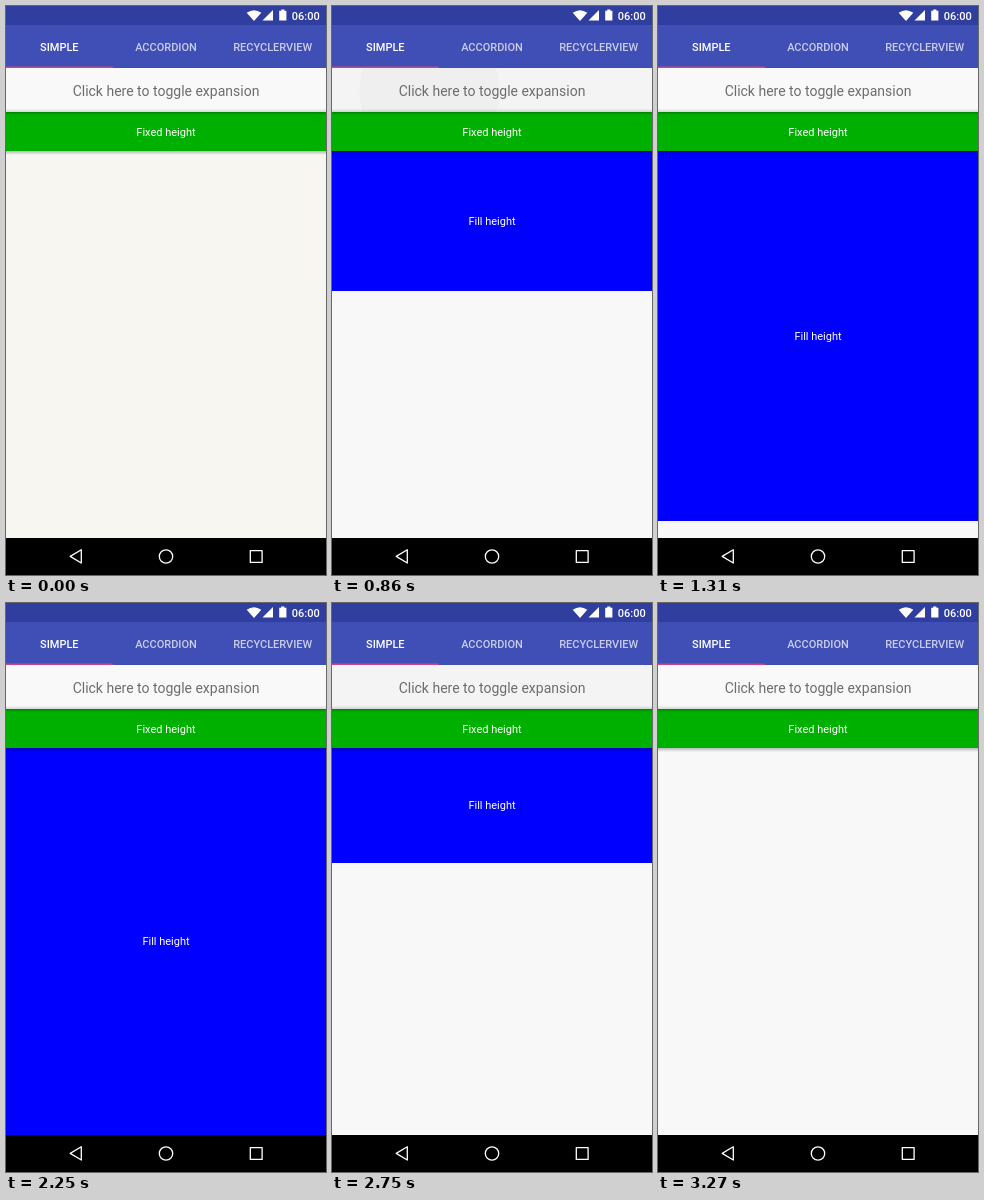
An HTML page for the animation above (3290 ms loop, 320 by 569 pixels).

```html
<!DOCTYPE html>
<html lang="en">
<head>
<meta charset="utf-8">
<title>Expandable layout</title>
<style>
  html, body { margin: 0; width: 100%; height: 100%; overflow: hidden; background: #000; }
  #stage { display: block; width: 100vw; height: 100vh; }
  text { font-family: Roboto, sans-serif; font-size: 11px; fill: #fff; text-anchor: middle; }
  .medium { font-weight: 500; }
  .idle { fill: #c9cdea; }
  .row { font-size: 14px; fill: #6d6d6d; }
  .nav { fill: none; stroke: #fff; stroke-width: 1.3; stroke-linejoin: round; }
</style>
</head>
<body>
<svg id="stage" viewBox="0 0 320 569">
  <defs>
    <linearGradient id="down" x2="0" y2="1">
      <stop offset="0" stop-opacity=".26"/>
      <stop offset="1" stop-opacity="0"/>
    </linearGradient>
    <linearGradient id="up" x2="0" y2="1">
      <stop offset="0" stop-opacity="0"/>
      <stop offset="1" stop-opacity=".14"/>
    </linearGradient>
    <clipPath id="rowClip"><rect y="62" width="320" height="44"/></clipPath>
  </defs>

  <rect id="page" y="62" width="320" height="470" fill="#f8f8f8"/>

  <!-- expanding panel -->
  <svg id="panel" y="145" width="320" height="0" overflow="hidden">
    <rect width="320" height="400" fill="#00f"/>
    <text id="fill" x="160">Fill height</text>
  </svg>

  <!-- toggle row -->
  <rect y="62" width="320" height="44" fill="#f9f9f9"/>
  <g clip-path="url(#rowClip)">
    <rect id="tint" y="62" width="320" height="44" opacity="0"/>
    <circle id="ripple" cx="97.5" cy="84" opacity="0"/>
  </g>
  <rect y="102.5" width="320" height="3.5" fill="url(#up)"/>
  <text class="row" x="160" y="89.5">Click here to toggle expansion</text>

  <!-- fixed panel -->
  <rect y="106" width="320" height="39" fill="#00b000"/>
  <rect y="106" width="320" height="3" fill="url(#down)"/>
  <rect y="145" width="320" height="4" fill="url(#down)"/>
  <text x="160" y="129.5">Fixed height</text>

  <!-- status bar and tabs -->
  <rect width="320" height="19" fill="#303f9f"/>
  <rect y="19" width="320" height="43" fill="#3f4fb5"/>
  <rect y="60.5" width="106.7" height="1.5" fill="#c9468f"/>
  <g class="medium">
    <text x="53.3" y="45">SIMPLE</text>
    <text class="idle" x="160" y="45">ACCORDION</text>
    <text class="idle" x="266.7" y="45">RECYCLERVIEW</text>
    <text x="299.8" y="13.5">06:00</text>
  </g>
  <g fill="#fff">
    <path d="M240.7 6.8Q248 1.6 255.3 6.8L248 15Z"/>
    <path d="M267 4V14.5H256.5Z"/>
    <path d="M273.2 4.8H275.2V3.6H278.4V4.8H280.4V14.6H273.2Z"/>
  </g>

  <!-- navigation bar -->
  <rect y="532" width="320" height="37"/>
  <g class="nav">
    <path d="M75.3 543.8V557L64.2 550.4Z"/>
    <circle cx="160" cy="550.5" r="6.7"/>
    <rect x="244.3" y="544.6" width="11.8" height="11.8"/>
  </g>
</svg>
<script>
  const LOOP = 3290, STEP = 26.2, FULL = 387;
  const EXPAND = { tap: 520, steps: 40, start: 561, time: 1004 };
  const COLLAPSE = { tap: 2250, steps: 39, start: 2277, time: 1050 };
  const $ = id => document.getElementById(id);
  const clamp = v => Math.min(1, Math.max(0, v));

  // cubic-bezier(.4, 0, .2, 1)
  function ease(x) {
    let lo = 0, hi = 1;
    for (let i = 0; i < 24; i++) {
      const s = (lo + hi) / 2, r = 1 - s;
      if (1.2 * r * r * s + 0.6 * r * s * s + s * s * s < x) lo = s; else hi = s;
    }
    return lo * lo * (3 - 2 * lo);
  }

  function sinceTap(t, move) {
    const k = Math.floor((t - move.tap + 5) / STEP);
    return Math.min(k, move.steps) * STEP;
  }

  function draw(t) {
    const touched = t >= EXPAND.tap;
    const move = t < COLLAPSE.tap ? EXPAND : COLLAPSE;
    const u = touched ? sinceTap(t, move) : 0;
    const p = clamp((move.tap + u - move.start) / move.time);
    const e = p === 1 ? 1 : ease(p);
    const h = !touched ? 0 : Math.floor(FULL * (move === EXPAND ? e : 1 - e));

    $('panel').setAttribute('height', h);
    $('fill').setAttribute('y', h / 2 + 3.8);
    $('page').setAttribute('fill', touched ? '#f8f8f8' : '#f8f6f1');
    $('ripple').setAttribute('r', 0.206 * u);
    $('ripple').setAttribute('opacity', 0.06 * clamp(u / 60) * clamp((400 - u) / 180));
    $('tint').setAttribute('opacity', 0.02 * clamp(u / 100) * clamp((700 - u) / 180));
  }

  const origin = performance.now();
  function tick() {
    draw((performance.now() - origin) % LOOP);
    requestAnimationFrame(tick);
  }
  tick();
</script>
</body>
</html>
```
